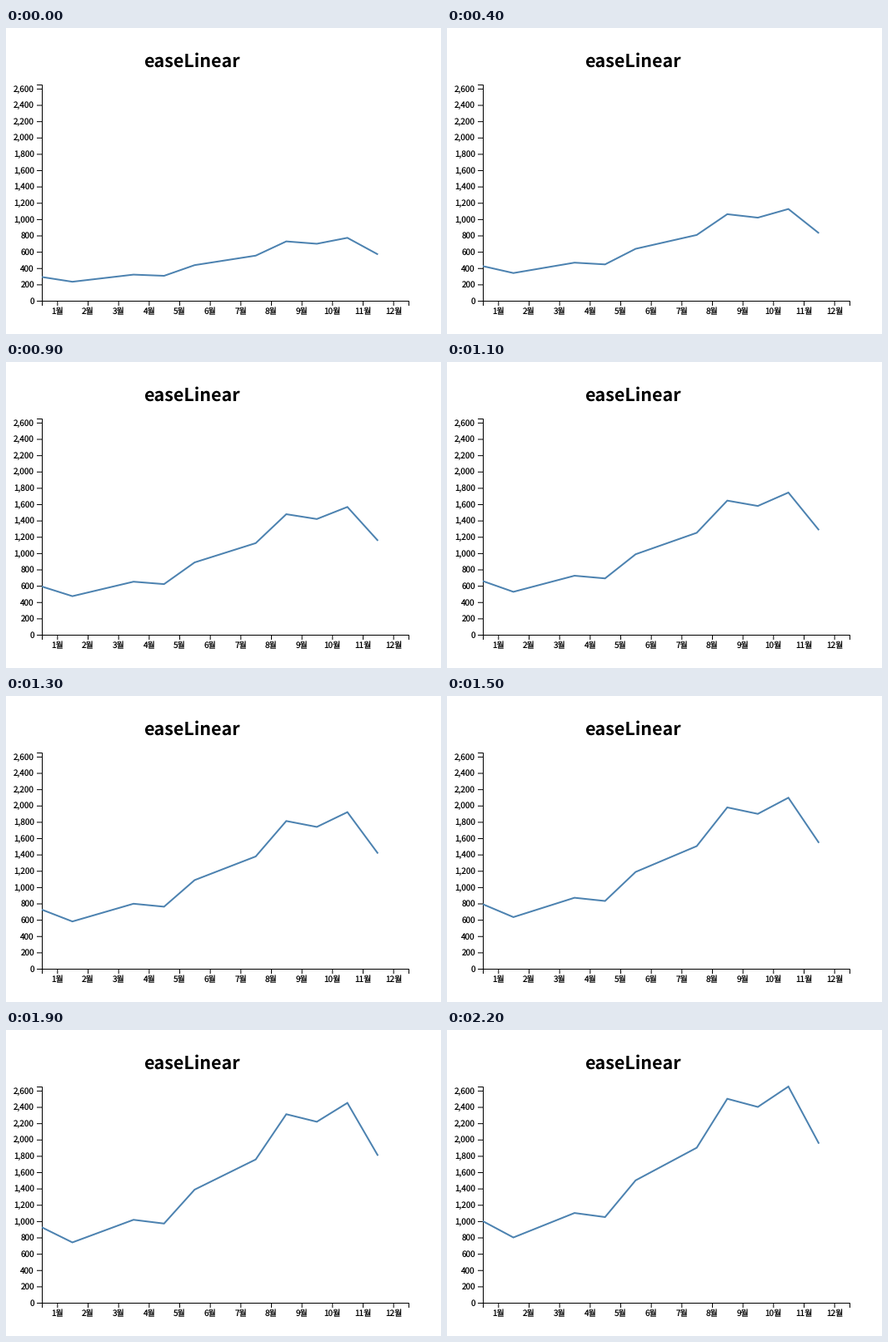
A matplotlib script that plays this animation: 522x368 px, repeating every 5200 ms.

```python
import numpy as np
import matplotlib.pyplot as plt
from matplotlib.animation import FuncAnimation

W, H, DPI = 522, 368, 64
PX = 72 / DPI                       # points per pixel
LEFT, TOP, WIDTH, HEIGHT = 43, 68, 440, 260
BOTTOM = TOP + HEIGHT
FRAMES, INTERVAL = 52, 100
START, STEP = 0.291, 1 / 30         # linear growth per frame

sales = np.array([1000, 800, 950, 1100, 1050, 1500,
                  1700, 1900, 2500, 2400, 2650, 1950])
band = WIDTH / len(sales)
scale = HEIGHT / sales.max()

plt.rcParams.update({"font.family": "Noto Sans CJK JP",
                     "text.hinting": "none", "text.hinting_factor": 1})
fig = plt.figure(figsize=(W / DPI, H / DPI), dpi=DPI, facecolor="white")
ax = fig.add_axes([0, 0, 1, 1])
ax.set_xlim(0, W)
ax.set_ylim(H, 0)
ax.axis("off")


def stroke(xs, ys):
    ax.plot(xs, ys, color="black", lw=PX, solid_capstyle="butt",
            solid_joinstyle="miter", snap=False)


def label(x, y, text, size=10, ha="center", weight="normal"):
    ax.text(x, y, text, fontsize=size * PX, ha=ha, va="baseline",
            weight=weight, color="black")


def draw_axes():
    x0, x1 = LEFT + 0.5, LEFT + WIDTH + 0.5
    y0, y1 = BOTTOM + 0.5, TOP + 0.5
    stroke([LEFT - 6, x0, x0, LEFT - 6], [y1, y1, y0, y0])
    stroke([x0, x0, x1, x1], [BOTTOM + 6, y0, y0, BOTTOM + 6])
    for value in range(0, 2601, 200):
        y = y0 - value * scale
        if value:
            stroke([LEFT - 6, LEFT], [y, y])
        label(LEFT - 9, y + 3.2, f"{value:,}", ha="right")
    for i in range(len(sales)):
        x = x0 + band * (i + 0.5)
        stroke([x, x], [BOTTOM, BOTTOM + 6])
        label(x, BOTTOM + 16, f"{i + 1}월")


draw_axes()
label(223, 47, "easeLinear", size=21.5, weight="bold")
line, = ax.plot([], [], color="#4c82b0", lw=2 * PX, snap=False,
                solid_capstyle="butt", solid_joinstyle="miter", zorder=5)


def update(k):
    grown = min(1, START + STEP * k)
    line.set_data(LEFT + band * np.arange(len(sales)),
                  BOTTOM - sales * scale * grown)
    return line,


anim = FuncAnimation(fig, update, frames=FRAMES, interval=INTERVAL,
                     repeat=True, repeat_delay=0)
plt.show()
```
